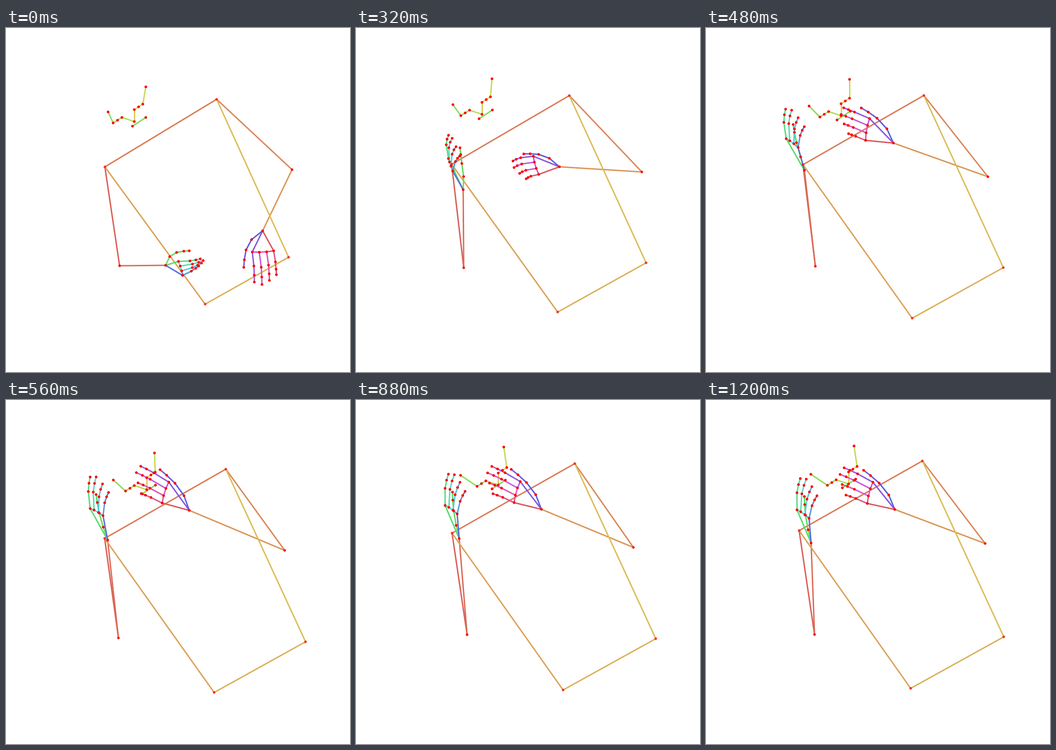
A matplotlib script for the animation above (1280 ms loop, 748 by 748 pixels).

```python
import colorsys

import numpy as np
import matplotlib.pyplot as plt
from matplotlib.animation import FuncAnimation
from matplotlib.collections import LineCollection

SIZE, DPI = 748, 100
FRAMES, INTERVAL = 16, 80
PX = 72 / DPI  # points per pixel

# Left shoulder, elbow, wrist; right elbow, wrist; nose; torso stretch.
BODY_TIMES = [0, 2, 5, 7, 9, 13, 15]
BODY = np.array([
    [215, 302, 247, 517, 347, 516, 622, 308, 558, 441, 279, 203.5, 0],
    [214, 307, 247, 526, 297.5, 435, 619.5, 305.5, 496, 385, 272.5, 198.5, 0.02],
    [207, 293, 231.5, 518.5, 213, 322, 620, 318, 422, 268, 280, 185.5, 0.73],
    [214.5, 301, 244.5, 517.5, 221, 304.5, 606, 327, 398.5, 240, 306, 195, 0.82],
    [210, 292, 242.5, 512, 225, 303.5, 602, 320, 398.5, 233.5, 305, 183.5, 0.92],
    [207.5, 288.5, 240, 510.5, 224, 302.5, 606, 320.5, 408.5, 242.5, 313, 188, 0.97],
    [202.5, 284, 236, 510, 228.5, 311, 607, 312, 410.5, 238, 310, 182.5, 1],
])
BODY_EDGES = [(0, 1), (1, 2), (0, 3), (3, 4), (4, 5), (0, 6), (6, 7), (3, 7)]
LEFT_WRIST, RIGHT_WRIST, NOSE = 2, 5, 8

# From the nose: inner eye, outer eye, ear on each side, then the mouth corners.
FACE = np.array([(0, -26), (18.5, -38), (25, -75.5), (-27, -9),
                 (-46, 3), (-57, -21), (-4, 10), (25, -9)])

# Thumb, index finger (base, middle joint, tip), little finger (base, tip).
HAND_TIMES = [0, 2, 5, 7]
LEFT_HAND = np.reshape([
    356, 497, 371, 488, 398.5, 484.5, 375, 507.5, 400, 506.5, 422.5, 502, 384, 538, 419, 517.5,
    312.5, 411, 320, 390, 328, 368.5, 291, 379, 294, 360, 304, 349.5, 277, 413, 295, 393,
    207, 292.5, 199, 262, 192, 224, 174, 254, 168.5, 220.5, 172.5, 195, 196, 276.5, 211, 237,
    211.5, 276.5, 202.5, 245.5, 196, 205.5, 183, 236, 179, 199, 183, 167.5, 211, 251.5, 223, 201,
], (4, 8, 2))
RIGHT_HAND = np.reshape([
    534, 460, 522, 482.5, 517, 520.5, 535.5, 487, 539, 517.5, 540, 552.5, 582, 484.5, 588, 536.5,
    466, 391, 445.5, 404, 424, 430.5, 451, 407, 438, 432, 425.5, 460.5, 490.5, 423, 468.5, 467.5,
    405, 240, 382, 222, 347, 208, 365, 225.5, 333, 218, 314, 215, 363.5, 272.5, 334, 266,
    387, 208, 367.5, 181, 335, 151.5, 354, 178.5, 321.5, 158.5, 293, 144, 339.5, 224, 294, 203.5,
], (4, 8, 2))


def spline(times, keys, t):
    """Smooth cubic path through key poses; holds the last one."""
    t = min(t, times[-1])
    i = min(np.searchsorted(times, t, side="right"), len(times) - 1) - 1
    slope = np.gradient(keys, times, axis=0)
    span = times[i + 1] - times[i]
    u = (t - times[i]) / span
    ease = u * u * (3 - 2 * u)
    return (keys[i] * (1 - ease) + keys[i + 1] * ease
            + span * u * (1 - u) * ((1 - u) * slope[i] - u * slope[i + 1]))


def ramp(t, start, end):
    return np.clip((t - start) / (end - start), 0, 1)


def chain(points):
    return list(zip(points[:-1], points[1:]))


def body_joints(t):
    """The torso grows as it comes closer; the other joints are keyed."""
    *coords, grow = spline(BODY_TIMES, BODY, t)
    shoulder, elbow, wrist, far_elbow, far_wrist, nose = np.reshape(coords, (6, 2))
    far_shoulder = shoulder + (243 + 25 * grow, -147 - 4.5 * grow)
    hip = shoulder + (218 + 24.5 * grow, 298.5 + 44.5 * grow)
    far_hip = far_shoulder + (156.5 + 20.5 * grow, 343.5 + 39 * grow)
    return np.array([shoulder, elbow, wrist, far_shoulder, far_elbow, far_wrist,
                     hip, far_hip, nose])


def face_parts(nose, t):
    turn = ramp(t, 2, 10)
    pose = nose + FACE
    pose[2] += turn * np.array([-13, -7])
    pose[5, 0] -= 25 * turn
    pose[6:] += turn * np.array([-9.5, -1.5])
    edges, dots = [], []
    for inner, outer, ear in (pose[:3], pose[3:6]):
        side = [inner, (inner + outer) / 2, outer, ear]
        edges += chain([nose] + side)
        dots += side
    edges.append((pose[6], pose[7]))
    return edges, dots + [pose[6], pose[7]]


def full_finger(base, middle, tip):
    """Add the last knuckle, pushed outwards when the finger is bent."""
    upper, lower = middle - base, tip - middle
    along = lower * (upper @ lower) / (lower @ lower + 1e-9)
    return [base, middle, middle + 0.57 * lower + 0.1 * (upper - along), tip]


def like_index(index, base, tip):
    """A finger from base to tip that bends as the index finger does."""
    to_complex = lambda v: complex(*v)
    bend = to_complex(index[1] - index[0]) / to_complex(index[2] - index[0])
    middle = bend * to_complex(tip - base)
    return np.array([base, base + (middle.real, middle.imag), tip])


def hand_parts(poses, joint, body, t, tilt):
    anchors = np.array([body_joints(k)[joint] for k in HAND_TIMES])
    pose = spline(HAND_TIMES, poses - anchors[:, None], t)
    c, s = np.cos(tilt), np.sin(tilt)
    wrist = body[joint]
    pose = pose @ np.array([[c, s], [-s, c]])
    thumb, index = pose[:3], pose[3:6]
    little = like_index(index, *pose[6:])

    # The two middle fingers blend their neighbours and are a little longer.
    fingers = [thumb, index]
    for share, reach in ((1 / 3, 1.15), (2 / 3, 1.1)):
        blend = index + share * (little - index)
        fingers.append(1.03 * blend[0] + reach * (blend - blend[0]))
    fingers = [full_finger(*(wrist + f)) for f in fingers + [little]]

    edges = chain([wrist] + fingers[0]) + chain([wrist] + fingers[1])
    for previous, finger in zip(fingers[1:], fingers[2:]):
        edges += chain([previous[0]] + finger)
    edges.append((wrist, fingers[-1][0]))
    return edges, [p for finger in fingers for p in finger]


def skeleton(t):
    body = body_joints(t)
    edges, dots = [(body[a], body[b]) for a, b in BODY_EDGES], list(body)
    for part_edges, part_dots in (
            face_parts(body[NOSE], t),
            hand_parts(LEFT_HAND, LEFT_WRIST, body, t, 0.105 * ramp(t, 7, 9)),
            hand_parts(RIGHT_HAND, RIGHT_WRIST, body, t, -0.05 * ramp(t, 7, 15))):
        edges += part_edges
        dots += part_dots
    return edges, dots


fig = plt.figure(figsize=(SIZE / DPI, SIZE / DPI), dpi=DPI, facecolor="white")
ax = fig.add_axes([0, 0, 1, 1])
ax.set(xlim=(0, SIZE), ylim=(SIZE, 0))
ax.axis("off")

edges, dots = skeleton(0)
hues = [0.01 + k / len(edges) for k in range(len(edges))]
bones = LineCollection(edges, colors=[colorsys.hls_to_rgb(h % 1, 0.6, 0.65) for h in hues],
                       linewidths=3 * PX, capstyle="round", zorder=1)
ax.add_collection(bones)

dot_colors = np.tile([1.0, 0, 0, 1], (len(dots), 1))
dot_colors[[0, 3, 6, 7], 3] = 0.7
dot_colors[[1, 4], 3] = 0.85
joints = ax.scatter(*np.transpose(dots), s=(5.8 * PX) ** 2, c=dot_colors,
                    linewidths=0, zorder=2)


def update(frame):
    edges, dots = skeleton(frame)
    bones.set_segments(edges)
    joints.set_offsets(dots)
    return bones, joints


anim = FuncAnimation(fig, update, frames=FRAMES, interval=INTERVAL,
                     repeat=True, repeat_delay=0)
plt.show()
```
